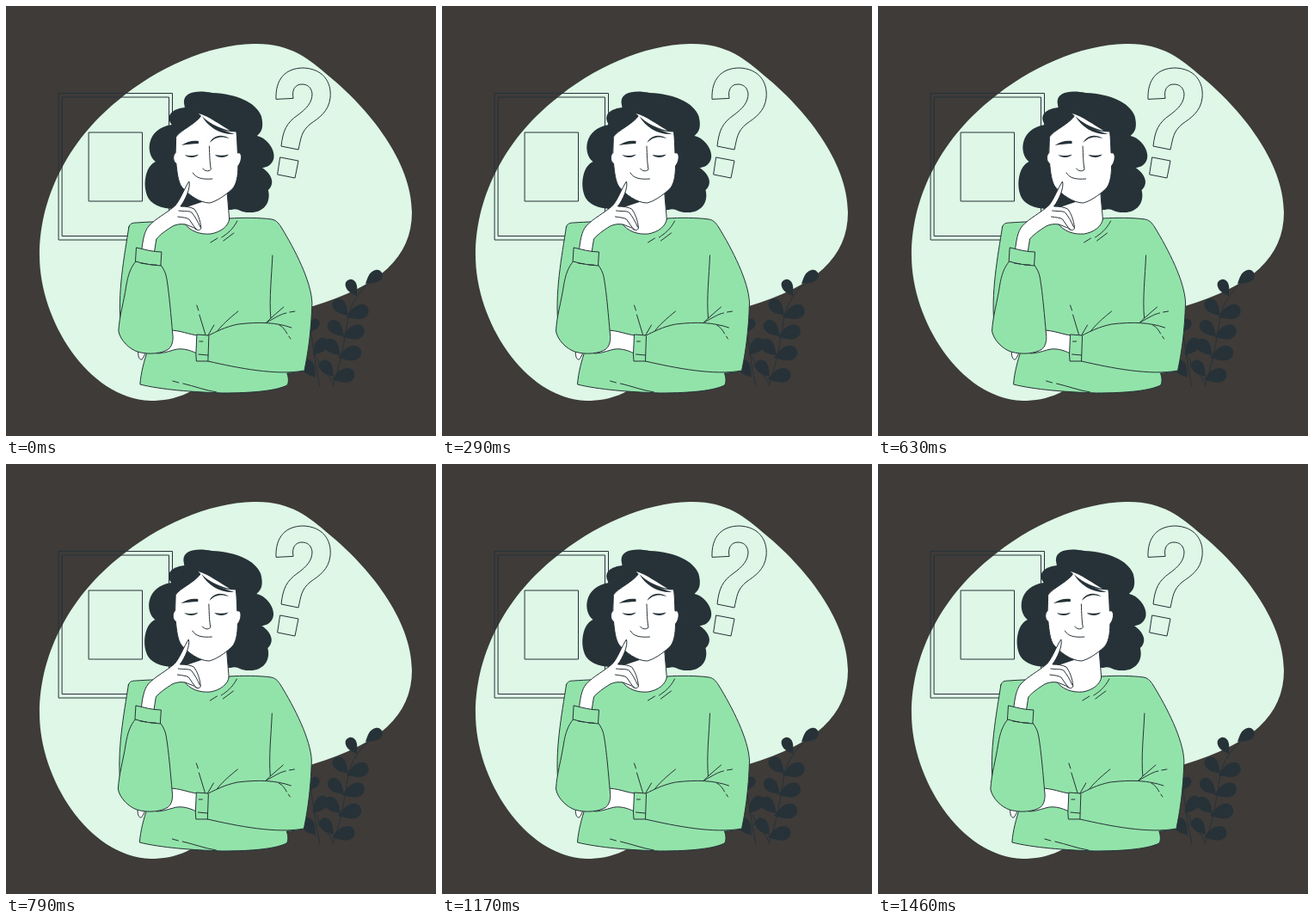
Write an HTML page that moves like this. It is 500 by 500 pixels and loops after 1500 ms.

```html
<!DOCTYPE html>
<html lang="en">
<head>
<meta charset="utf-8">
<title>Thinking woman</title>
<style>
  html, body { margin: 0; height: 100%; overflow: hidden; background: #3e3b39; }
  svg { display: block; width: 100%; height: 100%; }
  .ink { fill: #263238; stroke: none; }
  .line { fill: none; }
  .skin { fill: #fff; }
  .knit { fill: #92e3a9; }
</style>
</head>
<body>
<svg viewBox="0 0 500 500" stroke="#263238" stroke-linecap="round" stroke-linejoin="round">
  <path fill="#def7e6" stroke="none" d="M288 44C330 43 352 61 376 82C420 118 472 180 472 240C472 292 434 326 357 349C290 370 262 425 211 450C196 457 182 459 168 459C95 456 39 365 39 290C39 215 80 150 130 110C175 72 235 45 288 44Z"/>

  <g class="line" stroke-linejoin="miter">
    <path d="M61.5 101.5H193.5V272H61.5ZM65.5 106H189.5V267.5H65.5ZM96.5 147H158.5V227H96.5Z"/>
    <path d="M314 108C313 85 325 72 346 72C368 73 379 88 377 107C375 123 364 130 354 137C343 146 343 154 340 167L320 163C322 145 326 136 339 127C350 119 356 112 356 102C355 94 350 91 344 91C336 91 332 98 334 107ZM319 176L340 180L336 200L316 196Z"/>
  </g>

  <g id="plant">
    <path class="line" d="M380 442C388 420 394 390 398 360C402 346 409 334 422 322M365 442C360 420 357 395 354 375M363 420C366 412 360 408 357 404M381 440L374 429"/>
  </g>

  <g id="woman">
    <path class="ink" d="M207 112C207 99 224 98 240 101C268 102 291 112 297 128C300 140 298 146 292 151C306 154 316 172 310 181C307 186 302 188 298 188C310 196 313 207 305 214C309 230 298 241 283 240C272 240 270 234 262 237L205 236C190 237 172 234 166 224C158 210 162 186 174 181C162 172 163 142 193 138C186 130 190 120 208 118Z"/>

    <path class="skin" stroke="none" d="M204 236L228 228L257 212L260 249L254 270H205Z"/>
    <path class="line" d="M257 214L260 250"/>
    <path class="skin" d="M198 152C203 144 222 137 228 126C238 139 252 146 268 146C269 154 269 162 269.500 171C275 169 275 180 270 186C270 198 268 208 263 213C254 221 245 227 237 229C225 229 212 219 205 211C200 205 199 192 198 183C194 181 194 173 197 171Z"/>
    <path class="skin" stroke="none" d="M224 125C236 128 250 139 261 145C247 142 234 135 224 125Z"/>
    <path class="ink" d="M228 128C236 136 247 143 266 149C250 150 235 141 228 128ZM204 162C211 157 218 156 224 157L224 160C217 160 211 161 204 162ZM237 159C240 152 249 147 260 154C250 151 244 152 237 159ZM208 173C213 175 219 174 224 172.500C222 177 211 177 208 173ZM243 173C249 174 254 174 259 172.500C257 177 246 177 243 173Z"/>
    <path class="line" d="M236.500 163C237 174 237 182 238.500 190C236 193 231 192 229 189M217.500 194C221 200 228 202 240 201"/>

    <path class="skin" d="M154 400C153 406 155 412 158 411C160 409 161 406 163 402"/>
    <path class="knit" d="M143 257C144 253 147 252 152 252C165 251 185 250 207 252C214 262 226 266 238 265C250 263 259 256 260 247C275 246 295 246 309 248C315 249 318 254 320 257C336 283 355 320 356 345C355 380 351 405 347 424C340 426 334 427 327 427C329 433 329 438 327 441C315 447 290 450 252 450C218 449 180 446 156 440C157 426 161 412 165 400L134 375C129 335 138 290 143 257Z"/>
    <path class="skin" d="M190 377C203 377 213 382 223 383L222 404C214 400 204 397 195 400C188 402 182 404 176 404Z"/>
    <path class="knit" d="M332 374C315 368 295 367 270 370C255 373 244 379 236 383L222 382L221 405L221.500 413L235 413C270 421 315 430 347 424"/>
    <path class="line" d="M236 384L235 413M225 390H229M224 405L235 406M310 290C309 315 306 340 308 363L323 350M303 368C314 362 320 358 326 357M330 356L336 355M308 363L303 368M318 371C322 373 325 377 327 381M329 384L331 387M222 348L224 354M225 359L232 382M270 355C260 363 250 372 246 378M242 371L235 383M269 250C264 260 257 265 251 269M265 264L253 273M238 275L246 270M194 436L201 438M206 439C219 442 232 447 245 449"/>

    <path class="skin" d="M158 284C159 273 161 262 166 256C174 247 187 241 197 232C203 225 208 211 213 204C215 211 209 225 203 233C210 233 215 234 219 236C223 241 226 249 227 258C226 262 222 261 219 258L209 254C203 253 198 254 194 256C186 261 179 266 175 271L172 290Z"/>
    <path class="line" d="M201 238C207 239 213 238 216 240C220 245 223 250 226 257M200 245C206 246 210 246 213 248C216 252 218 256 222 260"/>
    <path class="knit" d="M151 297C145 304 142 313 140 325C137 345 132 360 131 378C133 389 144 399 153 402C166 406 182 404 189 399C193 396 195 389 194 382C192 360 190 335 187 317C186 310 183 305 180 301Z"/>
    <path class="knit" d="M152 281C161 283 171 286 181 286L180 302C170 301 160 300 151 297Z"/>
    <path class="line" d="M157 299L164 300M169 301H175"/>
  </g>
</svg>
<script>
  // Leaves: stem x, stem y, angle, length
  const leaves = [
    [408, 337, -119, 21], [418, 323, -36, 23],
    [398, 360, -132, 24], [396, 362, -22, 27],
    [393, 384, -135, 24], [391, 385, -20, 27],
    [389, 406, -134, 24], [386, 409, -17, 28],
    [381, 431, -128, 23], [379, 434, -15, 27],
    [353, 380, -60, 18], [357, 406, -50, 24], [360, 432, -125, 24]
  ];
  const plant = document.getElementById('plant');
  plant.insertAdjacentHTML('beforeend', leaves.map(([x, y, angle, size]) =>
    `<path class="ink" transform="translate(${x} ${y}) rotate(${angle}) scale(${size})"
      d="M0 0C.2-.12.4-.34.7-.3C.94-.26 1-.14 1 0C1 .14.92.27.7.3C.42.32.2.1 0 0Z"/>`).join(''));

  // Shake offsets at every tenth of the loop
  const shake = [0, -1, 2, -4, 4, -4, 4, -4, 2, -1, 0];
  const LOOP = 1500, STEPS = 36, STEP = LOOP / STEPS;
  const woman = document.getElementById('woman');

  function draw(now) {
    const step = Math.floor((now + 5) / STEP) % STEPS;
    const pos = (step + 0.5) / STEPS * 10;
    const i = Math.floor(pos);
    const x = shake[i] + (shake[i + 1] - shake[i]) * (pos - i);
    woman.setAttribute('transform', `translate(${x.toFixed(3)} 0)`);
    requestAnimationFrame(draw);
  }
  draw(0);
</script>
</body>
</html>
```
